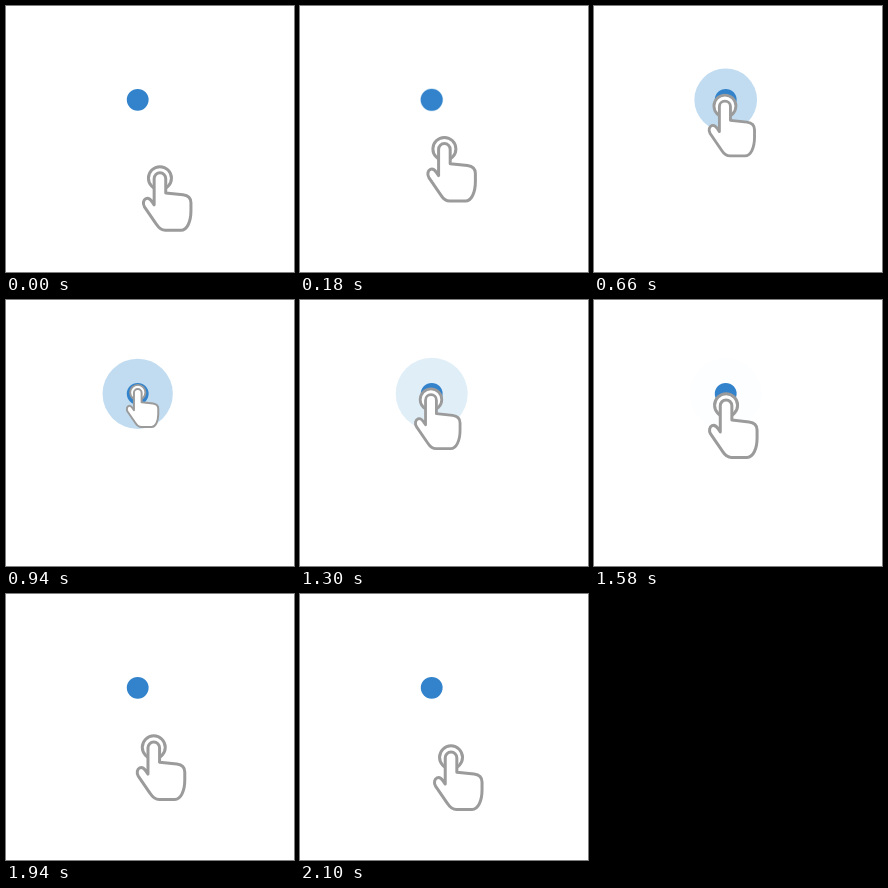
Animation of 288x266 px, one loop 2120 ms. Source, as an HTML page:

```html
<!DOCTYPE html>
<html lang="en">
<head>
<meta charset="utf-8">
<title>Tap gesture</title>
<style>
  html, body { margin: 0; width: 100%; height: 100%; overflow: hidden; background: #fff; }
  svg { display: block; }
  #hand { fill: #fff; stroke: #9b9b9b; stroke-width: 3; stroke-linejoin: round; }
</style>
</head>
<body>
<svg width="288" height="266" viewBox="0 0 288 266">
  <circle id="halo" cx="131.7" cy="93.8" fill="#338acd"/>
  <circle cx="131.7" cy="93.8" r="10.9" fill="#3283cb"/>
  <g id="hand">
    <circle cy=".3" r="11.5"/>
    <path d="M-5.8 27V.8A5.8 5.8 0 0 1 5.8 .8V15.2L23 17Q31 18 31 25V33C31 44 27 52.5 21 52.5H5.5C1.5 52.5-1 50.5-3.5 46.5L-15.5 29C-17.5 25.5-16.5 22-14 20.8C-11.5 19.7-9.5 21.5-8 23.8Z"/>
  </g>
</svg>
<script>
const LOOP = 2120;
const START = [154, 172], REST = [130.8, 101], END = [152, 166];
const halo = document.getElementById('halo');
const hand = document.getElementById('hand');

// Progress from 0 to 1 between two times
const span = (t, from, to) => Math.max(0, Math.min(1, (t - from) / (to - from)));
const easeOut = (u, power) => 1 - (1 - u) ** power;
const mix = (a, b, u) => a + (b - a) * u;

function draw() {
  const t = performance.now() % LOOP;

  const arrive = easeOut(span(t, 0, 520), 1.25);
  const leave = easeOut(span(t, 1560, 2248), 2);
  const press = Math.sin(Math.PI * span(t, 560, 1420)) ** 2;
  const [x, y] = REST.map((r, i) => mix(mix(START[i], r, arrive), END[i], leave));
  hand.setAttribute('transform',
    `translate(${x + press} ${y - 9 * press}) scale(${1 - 0.35 * press})`);

  halo.setAttribute('r', mix(10.8, 36, easeOut(span(t, 170, 1310), 3)));
  halo.setAttribute('opacity', t < 170 ? 0 : 0.3 * (1 - span(t, 1000, 1600)));
  requestAnimationFrame(draw);
}
draw();
</script>
</body>
</html>
```
